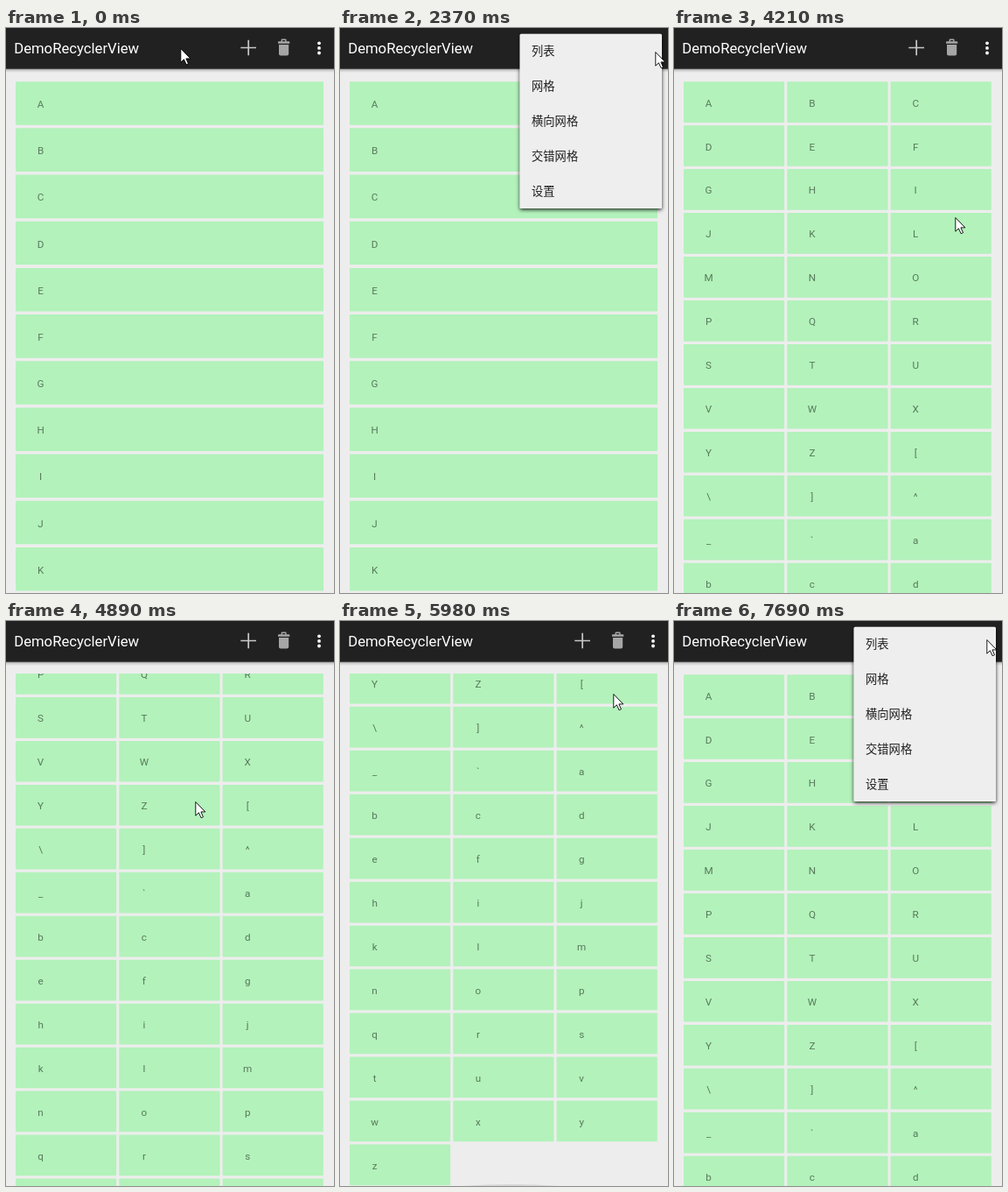
An HTML page that plays this animation: 375 by 645 pixels, repeating every 8 s.

```html
<!DOCTYPE html>
<html lang="zh">
<head>
<meta charset="utf-8">
<style>
html, body { margin: 0; width: 100%; height: 100%; overflow: hidden; background: #ededed; }
svg { display: block; width: 375px; height: 645px; font-family: Roboto, sans-serif; }
.card { fill: #b3f2bb; }
.label { font-size: 11.7px; fill: #577a5b; text-anchor: middle; }
.item { font: 13.3px "Noto Sans CJK SC", "Noto Sans CJK", sans-serif; fill: #1f1f1f; }
</style>
</head>
<body>
<svg viewBox="0 0 375 645">
  <defs>
    <clipPath id="view"><rect y="60" width="375" height="585"/></clipPath>
    <linearGradient id="fade" x1="0" y1="0" x2="0" y2="1">
      <stop offset="0" stop-color="#000" stop-opacity=".5"/>
      <stop offset=".4" stop-color="#000" stop-opacity=".16"/>
      <stop offset="1" stop-color="#000" stop-opacity="0"/>
    </linearGradient>
    <filter id="soft" x="-10%" y="-10%" width="120%" height="120%">
      <feDropShadow dx="0" dy="1.5" stdDeviation="2" flood-color="#000" flood-opacity=".85"/>
    </filter>
  </defs>
  <rect width="375" height="645" fill="#ededed"/>
  <g clip-path="url(#view)">
    <g id="list"></g>
    <g id="grid"></g>
    <path id="glow" fill="#000" fill-opacity=".1"/>
  </g>
  <rect y="46" width="375" height="5" fill="url(#fade)"/>
  <rect width="375" height="46.6" fill="#212121"/>
  <text x="9.2" y="29" font-size="16.7" fill="#fff">DemoRecyclerView</text>
  <path d="M268.3 22.5H286M277.2 13.7V31.3" stroke="#c8c8c8" stroke-width="1.7"/>
  <g fill="#a6a6a6" transform="translate(0 -.3)">
    <path d="M314.6 15.5V13.8Q314.6 12.8 315.6 12.8H319.6Q320.6 12.8 320.6 13.8V15.5H323.4Q324.3 15.5 324.3 16.6V18H311V16.6Q311 15.5 311.9 15.5ZM316 15.5H319.2V14.2H316Z" fill-rule="evenodd"/>
    <path d="M312 19.3H323.2V29.8Q323.2 31.8 321.2 31.8H314Q312 31.8 312 29.8Z"/>
  </g>
  <g fill="#fff">
    <circle cx="358" cy="17.3" r="1.9"/>
    <circle cx="358" cy="22.9" r="1.9"/>
    <circle cx="358" cy="28.5" r="1.9"/>
  </g>
  <circle id="ripple" cx="358" cy="23" r="20" fill="#fff" fill-opacity=".2"/>
  <g id="menu">
    <rect x="205.6" y="6.7" width="162.4" height="199.3" rx="1.5" fill="#eee" filter="url(#soft)"/>
  </g>
  <path id="cursor" d="M.8 .5V16.2L4.4 12.8L7.1 18.7L9.5 17.7L6.9 11.9H11.9Z" fill="#fff" stroke="#000" stroke-width=".9"/>
</svg>
<script>
const LOOP = 8000, STEP = 125, SCROLL_END = 413;
const GRID_AT = 3660, MENU_GONE = 3810;
const byId = id => document.getElementById(id);
const [list, grid, glow, ripple, menu, cursor] =
  ['list', 'grid', 'glow', 'ripple', 'menu', 'cursor'].map(byId);

function add(parent, tag, attrs, text = '') {
  const el = document.createElementNS('http://www.w3.org/2000/svg', tag);
  for (const key in attrs) el.setAttribute(key, attrs[key]);
  el.textContent = text;
  parent.append(el);
}

function addCards(parent, count, columns, width, height, pitch) {
  for (let i = 0; i < count; i++) {
    const x = 11 + i % columns * 118.3;
    const y = 61.2 + Math.floor(i / columns) * pitch;
    add(parent, 'rect', { class: 'card', x, y, width, height, rx: .8 });
    add(parent, 'text', { class: 'label', x: x + 28.6, y: y + height / 2 + 5 },
      String.fromCharCode(65 + i));
  }
}

addCards(list, 11, 1, 352, 49.6, 53.17);
addCards(grid, 58, 3, 115.2, 46.7, 49.96);
['列表', '网格', '横向网格', '交错网格', '设置'].forEach((name, i) =>
  add(menu, 'text', { class: 'item', x: 219, y: 31.2 + i * 39.85 }, name));

// Pointer strokes: start, number of jumps, then the x, y and scroll they reach
const strokes = [
  [1430, 5, 360, 27, 0],
  [3110, 2, 247, 56, 0],
  [4060, 2, 321, 216, 0],
  [4490, 2, 240, 462, 0],
  [4730, 2, 216, 206, 274],
  [5040, 2, 242, 400, 368],
  [5280, 5, 300, 122, 480],
  [5980, 1, 312, 83, SCROLL_END],
  [6120, 3, 272, 325, 170],
  [6480, 2, 253, 237, 0],
  [6750, 1, 292, 101, 0],
  [6870, 4, 357, 21, 0]
];

function poseAt(t) {
  let pose = [199, 23, 0];
  for (const [start, jumps, ...goal] of strokes) {
    if (t < start) break;
    const k = Math.min(1, (Math.floor((t - start) / STEP) + 1) / jumps);
    pose = pose.map((v, i) => v + (goal[i] - v) * k);
  }
  return pose;
}

const show = (el, on) => el.setAttribute('visibility', on ? 'visible' : 'hidden');
const within = (t, a, b) => t >= a && t < b;

// Overscroll: a flat cap that sinks to a sliver
function glowPath(t) {
  if (!within(t, 5400, 6120)) return '';
  const h = Math.max(2, Math.min(20, (5820 - t) / 13));
  const r = 756, half = Math.sqrt(2 * r * h);
  return `M${195 - half} 645A${r} ${r} 0 0 1 ${195 + half} 645Z`;
}

function drawMenu(t) {
  const leaving = within(t, GRID_AT, MENU_GONE);
  show(menu, within(t, 2370, MENU_GONE) || t >= 7570);
  menu.setAttribute('opacity', leaving ? .08 : 1);
  menu.setAttribute('transform', leaving
    ? 'translate(286.8 6.5) scale(.9 .83) translate(-286.8 -6.5)' : '');
}

function draw(t) {
  const [x, y, scroll] = poseAt(t);
  show(list, t < GRID_AT);
  show(grid, t >= GRID_AT);
  grid.setAttribute('transform', `translate(0 ${-Math.min(scroll, SCROLL_END)})`);
  glow.setAttribute('d', glowPath(t));
  show(ripple, within(t, 2220, 2370));
  drawMenu(t);
  cursor.setAttribute('transform', `translate(${x} ${y})`);
}

const start = performance.now();
function tick() {
  draw((performance.now() - start) % LOOP);
  requestAnimationFrame(tick);
}
tick();
</script>
</body>
</html>
```
